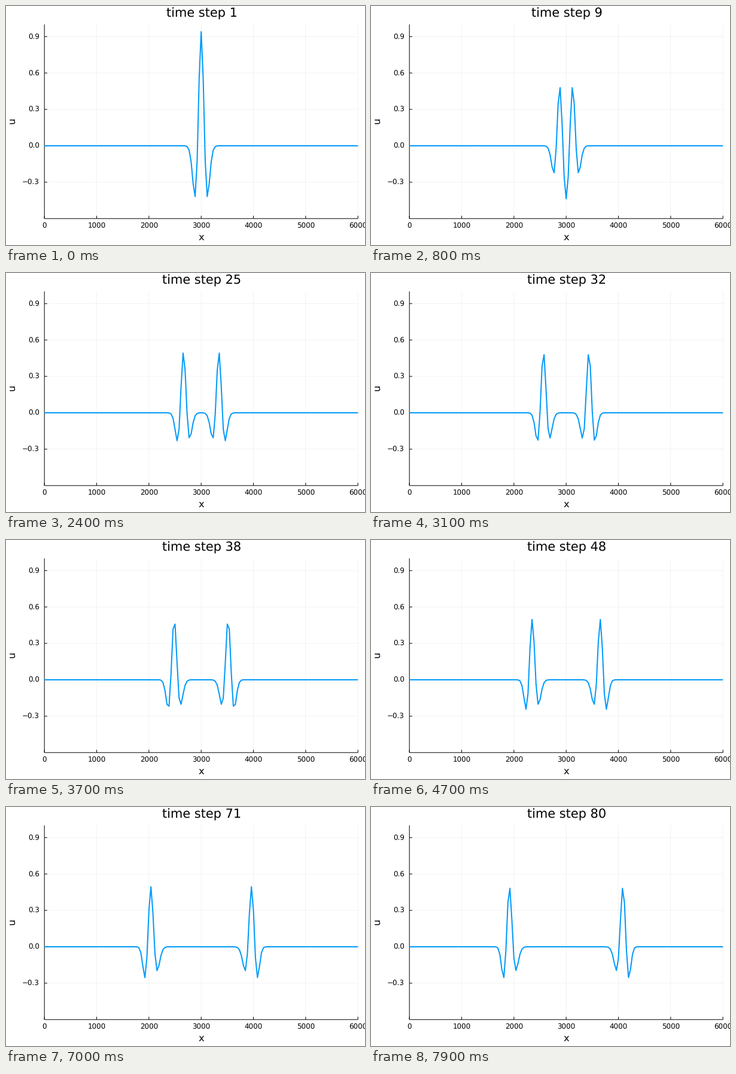
Animation, 600 px wide and 400 px high, one loop 8000 ms. Source, as a matplotlib script:

```python
import matplotlib.pyplot as plt
import numpy as np
from matplotlib.animation import FuncAnimation

W, H, DPI = 600, 400, 100
PT = 72 / DPI                      # points per pixel
LEFT, RIGHT, TOP, BOTTOM = 64.2, 588.19, 30.87, 355.8
TICK = 4.72
STEPS, CELLS = 80, 156
COURANT = 0.35                     # c * dt / dx
SHARP = 0.1615                     # wavelet width, in cells

plt.rcParams["font.family"] = "DejaVu Sans"
plt.rcParams["text.hinting"] = "none"


def px(x):
    return LEFT + (RIGHT - LEFT) * x / 6000


def py(u):
    return BOTTOM - (BOTTOM - TOP) * (u + 0.6) / 1.6


# Ricker pulse at rest, advanced by leapfrog with a spectral Laplacian
cell = np.arange(CELLS + 1)
a = SHARP * (cell - CELLS / 2) ** 2
pulse = np.fft.rfft((1 - 2 * a) * np.exp(-a))
wavenum = 2 * np.pi * np.fft.rfftfreq(CELLS + 1)
phase = 2 * np.arcsin(COURANT * wavenum / 2)


def wave(step):
    return np.fft.irfft(pulse * np.cos(step * phase), CELLS + 1)


fig = plt.figure(figsize=(W / DPI, H / DPI), dpi=DPI, facecolor="white")
ax = fig.add_axes([0, 0, 1, 1])
ax.set_xlim(0, W)
ax.set_ylim(H, 0)
ax.axis("off")


def rule(xs, ys, width=1, **kw):
    ax.plot(xs, ys, color="black", lw=width * PT, solid_capstyle="butt",
            snap=False, **kw)


def grid(xs, ys):
    rule(xs, ys, width=0.5, alpha=0.1, zorder=1)


def label(x, y, s, size, **kw):
    kw = {"ha": "center", "va": "baseline", **kw}
    return ax.text(x, y, s, fontsize=size * PT, color="black", **kw)


for v in range(0, 6001, 1000):
    x = px(v)
    grid([x, x], [TOP, BOTTOM])
    rule([x, x], [BOTTOM, BOTTOM - TICK])
    label(x, 372, str(v), 11.9)

for v in (-0.3, 0.0, 0.3, 0.6, 0.9):
    y = py(v)
    grid([LEFT, RIGHT], [y, y])
    rule([LEFT, LEFT + TICK], [y, y])
    label(56, y + 4.3, f"{v:.1f}".replace("-", "\u2212"), 11.9, ha="right")

rule([LEFT, LEFT], [TOP, BOTTOM])
rule([LEFT, RIGHT], [BOTTOM, BOTTOM])

label(326.2, 392, "x", 16.4)
label(15.7, 192, "u", 16.4, rotation=90, rotation_mode="anchor")
title = label(327, 18.9, "", 20.83)

curve, = ax.plot(px(cell * 6000 / CELLS), py(wave(1)), color="#009AF9",
                 lw=2 * PT, solid_joinstyle="round", solid_capstyle="butt",
                 snap=False, zorder=3)


def draw(i):
    step = i + 1
    title.set_text(f"time step {step}")
    curve.set_ydata(py(wave(step)))
    return title, curve


anim = FuncAnimation(fig, draw, frames=STEPS, interval=100, repeat=True,
                     repeat_delay=0, init_func=lambda: draw(0))
plt.show()
```
